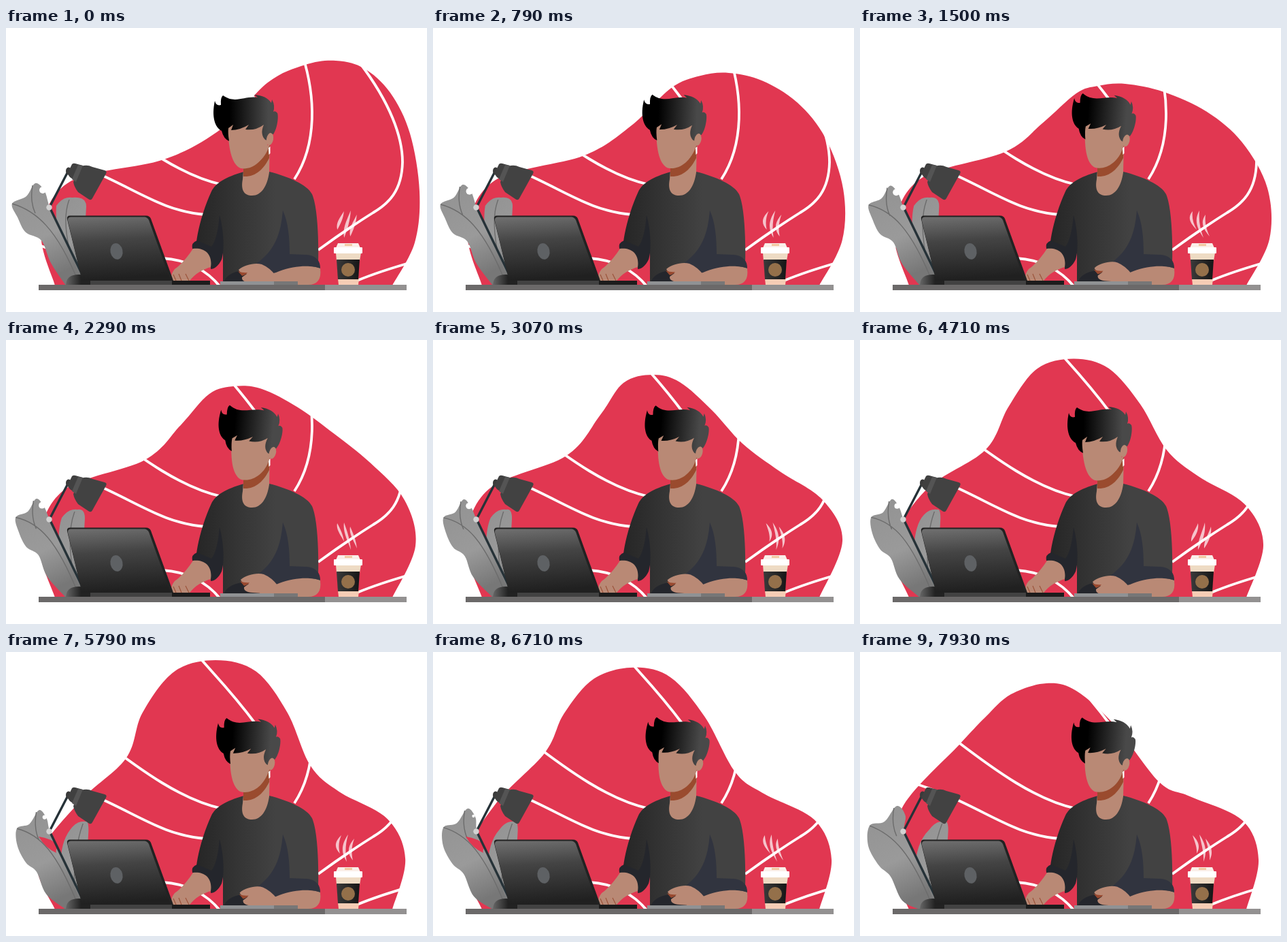
Recreate the animation shown at these times as an HTML page. Size 619 px wide and 417 px high, loop 8 s.

```html
<!DOCTYPE html>
<html lang="en">
<head>
<meta charset="utf-8">
<title>Working at the desk</title>
<style>
  html, body { margin: 0; width: 100%; height: 100%; overflow: hidden; background: #fff; }
  svg { display: block; width: 100vw; height: 100vh; }
  .line { fill: none; stroke: #fff; stroke-width: 3.8; }
  .vein { fill: none; stroke: #6c6c6c; stroke-width: 1.4; }
  .skin { fill: #b98975; }
  .navy { fill: #31343f; }
  .shade { fill: #24262c; }
</style>
</head>
<body>
<svg viewBox="0 0 619 417">
  <defs>
    <linearGradient id="hair"><stop offset=".25" stop-color="#000"/><stop offset=".85" stop-color="#494949"/></linearGradient>
    <linearGradient id="shirt"><stop offset="0" stop-color="#262626"/><stop offset=".65" stop-color="#424242"/></linearGradient>
    <linearGradient id="screen" x2=".1" y2="1"><stop offset="0" stop-color="#707070"/><stop offset=".4" stop-color="#444"/><stop offset="1" stop-color="#202020"/></linearGradient>
    <linearGradient id="leaf" x2=".3" y2="1"><stop offset="0" stop-color="#929292"/><stop offset=".6" stop-color="#9a9a9a"/><stop offset="1" stop-color="#777"/></linearGradient>
    <linearGradient id="foot"><stop offset="0" stop-color="#666"/><stop offset=".6" stop-color="#222"/></linearGradient>
    <linearGradient id="sleeve"><stop offset="0" stop-color="#3a3a3a"/><stop offset="1" stop-color="#161616"/></linearGradient>
  </defs>

  <path id="blob" fill="#e13751"/>
  <!-- White on a white page: these only show where the blob lies beneath them -->
  <g class="line">
    <path d="M280 3L304 30Q342 72 368 107"/>
    <path d="M436 40C455 100 458 170 424 222"/>
    <path d="M520 51C565 110 583 160 583 197C582 240 562 258 540 271Q500 296 459 326"/>
    <path d="M600 343Q550 357 516 371"/>
    <path d="M140 129C200 175 260 218 318 230"/>
    <path d="M70 190C175 220 215 268 293 274"/>
    <path d="M230 338C265 340 295 355 315 380"/>
    <path d="M40 316L66 325"/>
  </g>

  <!-- Plant -->
  <path id="backLeaf" fill="url(#leaf)"/>
  <path id="backVein" class="vein"/>
  <path id="frontLeaf" fill="url(#leaf)"/>
  <path id="frontVein" class="vein"/>
  <path id="gap" fill="#e13751" d="M48 271Q66 273 78 285Q72 290 74 295Q58 288 48 271"/>
  <circle id="notch" fill="#fff"/>

  <!-- Lamp -->
  <path fill="none" stroke="#263238" stroke-width="3.4" d="M113 364L64 263L91 211"/>
  <circle cx="63.5" cy="263.5" r="4.2" fill="#d2d2d2"/>
  <ellipse cx="92" cy="210" rx="4" ry="5.5" fill="#3a3a3a"/>
  <path fill="#404040" d="M91 212L97 200Q99 198 102 199L113 202L102 223Q91 220 91 212"/>
  <path fill="#424242" d="M111 203Q119 200 127 204L145 209Q149 210 147 214L127 250Q125 254 121 251L106 241Q100 233 99 226Z"/>
  <path fill="#545454" d="M106 201L113 202L103 226L97 222Z"/>
  <path fill="url(#foot)" d="M88 377Q89 362 107 362Q125 362 125 377Z"/>

  <!-- Man -->
  <path fill="url(#shirt)" d="M350 211C322 219 308 228 302 240C289 268 282 298 280 314L302 353L319 330V377H430L459 345C460 310 458 262 450 244C443 230 415 218 387 211Z"/>
  <path class="shade" d="M314 275C321 300 321 330 317 340C312 350 306 354 301 354C304 336 296 326 274 324Q272 315 281 312L302 321Q311 310 314 275"/>
  <path class="shade" d="M319 377Q322 360 347 356L380 345V377Z"/>
  <path class="navy" d="M407 268C404 302 396 326 368 346L392 362C415 350 440 348 462 354C463 342 455 334 443 333L417 332C417 308 415 285 407 268"/>
  <path class="skin" d="M275 324C292 322 304 332 301 351C288 355 278 361 270 371H245Q240 364 248 354Q262 344 275 324"/>
  <path fill="none" stroke="#9a5138" stroke-width="1.1" d="M246 362L250 371M254 361L258 371M264 361L269 371"/>
  <path class="skin" d="M370 362Q390 363 402 357C425 348 450 348 462 353Q465 377 444 377H375Z"/>
  <g id="hand">
    <path class="skin" d="M342 355C350 348 366 344 376 347Q388 352 397 364L388 376L360 374Q346 373 347 366L354 361Q344 361 342 355"/>
    <path fill="#99492f" d="M341 357Q348 360 355 359Q352 363 347 364Z"/>
  </g>
  <path class="skin" d="M388 170L387 212C384 233 375 246 362 246C350 246 345 238 348 222L350 195Z"/>
  <path fill="#9a4b2e" d="M349 203C364 206 382 193 388 170L387 191C379 207 367 219 349 218Z"/>
  <path fill="#fff" d="M386 176L388.500 174V184L386.500 186Z"/>
  <g id="head">
    <path class="skin" d="M326 144C327 175 331 200 345 206C361 209 379 196 384 174L390 145L378 133H330Z"/>
    <path fill="url(#hair)" d="M307 107C302 130 307 146 317 151Q320 163 328 166Q326 154 327 147L334 142L331 150Q344 150 357 142L352 149Q367 151 379 142Q373 156 381 164L386 166Q384 155 393 156C399 148 401 130 399 125Q396 121 393 123Q396 114 391 105L390 110Q383 99 365 98L370 102C351 99 337 112 319 99Q315 102 316 113Q309 115 307 107"/>
    <ellipse class="skin" cx="388" cy="163" rx="5" ry="9" transform="rotate(10 388 163)"/>
  </g>

  <!-- Laptop, notebook and desk -->
  <path fill="#222" d="M94 275.500H206Q211 275.500 213 280L246 371H112L90 281Q89 275.500 94 275.500"/>
  <path fill="url(#screen)" d="M95 277.500H204Q208 278 210 282L242 371H112L91 283Q90 278 95 277.500"/>
  <ellipse cx="162.500" cy="328" rx="9" ry="12" fill="#5e6164" transform="rotate(-12 162 328)"/>
  <path fill="#424242" d="M124 371H245V377H124Z"/>
  <path fill="#1c1c1c" d="M244 371H300V377H244Z"/>
  <path fill="#909294" d="M315 372H395V377H315Z"/>
  <path fill="#777" d="M394 372H429V377H394Z"/>
  <path fill="#6b6969" d="M48 377H470V385H48Z"/>
  <path fill="#939191" d="M469 377H589V385H469Z"/>

  <!-- Coffee -->
  <path id="steam" fill="#fff" opacity=".7"/>
  <path fill="#f6cdb5" d="M488 368H519L518 377H489Z"/>
  <path fill="#eedbc4" d="M485 330H522L520 342H486Z"/>
  <path fill="url(#sleeve)" d="M486 340H520L518 369H488Z"/>
  <circle cx="503" cy="355" r="10" fill="#94704a"/>
  <path fill="#faefe9" d="M488 316H518L521 323H485Z"/>
  <path fill="#f2c7a0" d="M498 317H509V320H498Z"/>
  <rect x="482" y="322" width="42" height="9" rx="1" fill="#fff"/>
</svg>

<script>
const LOOP = 8000;
const el = id => document.getElementById(id);
const set = (id, attributes) => {
  for (const name in attributes) el(id).setAttribute(name, attributes[name]);
};
const points = text => text.split(" ").map(pair => pair.split(",").map(Number));
const clamp = v => Math.max(0, Math.min(1, v));
const lerp = (a, b, k) => a + (b - a) * k;
const blend = (from, to, k) => from.map((p, i) => p.map((v, axis) => lerp(v, to[i][axis], k)));

// The blob's hump wanders left, rises, then sinks: five key outlines, left to right
const blobPoses = [
  [0, "52,298 95,225 232,193 318,147 385,80 440,54 485,48 526,59 565,95 594,155 608,240 601,315"],
  [1500, "50,298 88,222 213,182 268,140 318,96 350,85 390,82 447,94 510,123 562,168 599,235 602,310"],
  [3070, "48,298 82,219 196,170 246,110 280,63 323,51 363,62 410,103 455,152 510,193 573,235 602,295"],
  [6000, "46,305 110,220 175,155 197,88 245,26 307,9 368,26 414,88 447,168 488,206 560,246 586,305"],
  [7930, "45,305 64,225 147,135 185,95 222,62 274,46 318,57 375,108 440,191 485,212 562,247 586,305"],
].map(([time, text]) => ({ time, shape: points(text) }));

const leafStart = points("57,240 43,228 30,247 9,258 17,278 29,300 52,312 66,345");
const leafEnd = points("67,240 54,226 36,249 14,255 12,285 28,314 45,330 62,365");

// Smooth closed outline through the given points
function outline(pts) {
  const at = i => pts[Math.max(0, Math.min(pts.length - 1, i))];
  const handle = (p, before, after, sign) => p.map((v, axis) => v + sign * (after[axis] - before[axis]) / 6);
  let d = "M" + pts[0];
  for (let i = 1; i < pts.length; i++) {
    const c1 = handle(at(i - 1), at(i - 2), at(i), 1);
    const c2 = handle(at(i), at(i - 1), at(i + 1), -1);
    d += `C${c1} ${c2} ${at(i)}`;
  }
  return d + "Z";
}

function drawBlob(t) {
  const next = Math.max(1, blobPoses.findIndex(p => p.time > t));
  const last = t >= blobPoses.at(-1).time ? blobPoses.length - 1 : next;
  const a = blobPoses[last - 1], b = blobPoses[last];
  const shape = blend(a.shape, b.shape, (t - a.time) / (b.time - a.time));
  set("blob", { d: outline([[72, 378], ...shape, [568, 378]]) });
}

// The plant leans over the loop and shrinks a little halfway through
function drawPlant(t) {
  const u = t / LOOP;
  const squeeze = Math.sin(Math.PI * u);
  const leaf = blend(leafStart, leafEnd, u)
    .map(([x, y]) => [lerp(x, 35, 0.2 * squeeze), lerp(y, 300, 0.1 * squeeze)]);
  const [notch, top, , tip] = leaf;
  set("frontLeaf", { d: outline([[112, 376], [91, 318], [66, 268], ...leaf, [88, 378]]) });
  set("frontVein", { d: `M${tip}C${tip[0] + 35} 268 75 295 106 372M${top[0] - 4} ${top[1] + 3}q-4 24 4 41` });
  set("notch", { cx: notch[0] - 3, cy: notch[1] - 2, r: 5 * (1 - u ** 3) });
  set("gap", { opacity: clamp(4 - Math.abs(t - 6250) / 300) });

  const x = lerp(90, 118, u), right = lerp(118, 130, u) - 7 * squeeze;
  set("backLeaf", { d: `M112 378H96C80 345 72 290 ${x - 16} 261Q${x - 6} 247 ${x + 7} 249Q${right} 247 ${right} 262L${right - 1} 280L118 330Z` });
  set("backVein", { d: `M${x + 3} 252Q${x - 10} 285 100 350` });
}

function wisp(x, top, bottom, angle) {
  const lean = 5 * Math.cos(angle + 0.3);
  const bow = -7 * Math.sin(angle);
  const high = lerp(top, bottom, 0.35), low = lerp(top, bottom, 0.65);
  const left = x + bow - 3, right = x + bow + 3;
  return `M${x + lean} ${top}C${left + lean / 2} ${high} ${left - lean} ${low} ${x - lean} ${bottom}`
    + `C${right - lean / 2} ${low} ${right + lean / 4} ${high} ${x + lean} ${top}Z`;
}

function draw(t) {
  drawBlob(t);
  drawPlant(t);

  const nod = clamp(1.15 * (1 - Math.cos(2 * Math.PI * (t + 100) / 4750)) / 2);
  set("head", { transform: `rotate(${5.2 * nod} 360 207)` });
  set("hand", { transform: `translate(${3 * nod} ${-3 * nod})` });

  const angle = 2 * Math.PI * t / 4950;
  set("steam", { d: wisp(492, 269, 296, angle) + wisp(502, 268, 308, angle) + wisp(511, 274, 306, angle) });
}

const start = performance.now();
function tick() {
  draw((performance.now() - start) % LOOP);
  requestAnimationFrame(tick);
}
tick();
</script>
</body>
</html>
```
